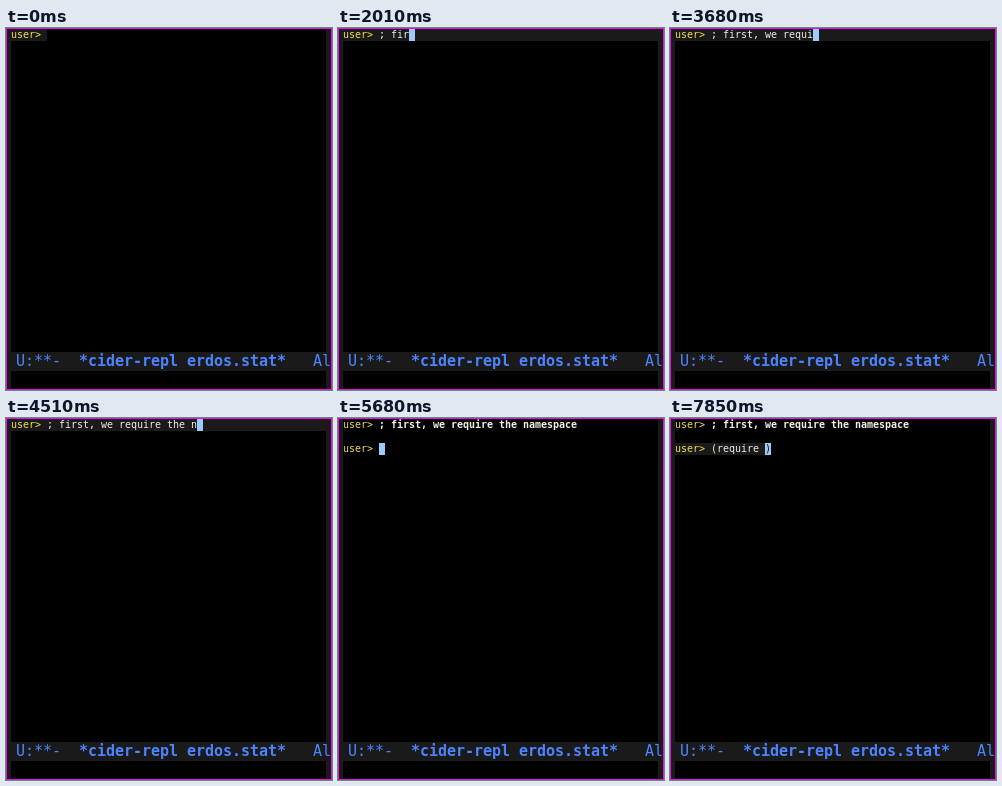
Recreate the animation shown at these times as an HTML page. Size 326x362 px, loop 8000 ms.

```html
<!DOCTYPE html>
<html lang="en">
<head>
<meta charset="utf-8">
<title>REPL typing</title>
<style>
html, body { margin: 0; width: 100%; height: 100%; overflow: hidden; background: #000; }
#stage { position: absolute; width: 326px; height: 362px; overflow: hidden; background: #000;
  font: 10px/12px "DejaVu Sans Mono", monospace; letter-spacing: -.0205px; color: #f0f0e8; }
#stage div { position: absolute; white-space: pre; }
.fringe { top: 0; height: 362px; background: #1a1a1a; }
.line { left: 5px; height: 12px; }
.hl { background: #1a1a1a; }
.wide { width: 315px; }
.done { font-weight: bold; }
.line i { font-style: normal; font-weight: normal; color: #f2e04c; }
.cursor { display: inline-block; width: 6px; height: 12px; vertical-align: top; background: #9ccbfa; color: #111; }
#mode { left: 0; top: 324px; width: 326px; height: 19px; background: #1a1a1a;
  font-size: 15px; line-height: 19px; letter-spacing: -.0308px; color: #4c83ff; text-indent: 10px; }
#frame { left: 0; top: 0; width: 326px; height: 362px; box-sizing: border-box; border: 1px solid #e010e0; }
</style>
</head>
<body>
<div id="stage">
  <div class="fringe" style="left:0;width:5px"></div>
  <div class="fringe" style="left:320px;width:6px"></div>
  <div class="line" id="first" style="top:1px"></div>
  <div class="line" id="second" style="top:25px"></div>
  <div id="mode">U:**-  <b>*cider-repl erdos.stat*</b>   Al</div>
  <div id="frame"></div>
</div>
<script>
// The screen refreshes six times a second; all times below count these ticks.
const TICK = 1000 / 6, LOOP = 48, ENTER = 34, BLINK = 3;
const COMMENT = '; first, we require the namespace', FORM = '(require ';
const PROMPT = '<i>user&gt; </i>';

// Typing pace: [tick, characters so far], linear in between
const commentPace = [[7, 1], [10, 2], [12, 5], [14, 6], [17, 9], [20, 14], [32, 33]];
const formPace = [[39, 1], [40, 1], [42, 4], [45, 8], [47, 9]];

const first = document.getElementById('first');
const second = document.getElementById('second');

function typed(pace, k) {
  const next = pace.findIndex(([at]) => k < at);
  if (next === 0) return 0;
  if (next < 0) return pace[pace.length - 1][1];
  const [k0, n0] = pace[next - 1], [k1, n1] = pace[next];
  return Math.round(n0 + (n1 - n0) * (k - k0) / (k1 - k0) - .05);
}

const cursor = (on, under = ' ') => on ? `<span class="cursor">${under}</span>` : '';

function show(line, html, style) {
  if (line.shown === html + style) return;
  line.shown = html + style;
  line.innerHTML = html;
  line.className = 'line ' + style;
}

function draw(k) {
  if (k < ENTER) {
    const n = typed(commentPace, k);
    const on = n > 0 || k >= 1 && k <= BLINK;
    show(first, PROMPT + COMMENT.slice(0, n) + cursor(on), n ? 'hl wide' : 'hl');
    show(second, '', '');
  } else {
    const n = typed(formPace, k);
    const on = n > 0 || k < ENTER + BLINK;
    show(first, PROMPT + COMMENT, 'done');
    show(second, PROMPT + FORM.slice(0, n) + cursor(on, n ? ')' : ' '), k < ENTER + 2 ? '' : 'hl');
  }
}

const start = performance.now();
(function tick() {
  draw(Math.floor((performance.now() - start) / TICK) % LOOP);
  requestAnimationFrame(tick);
})();
</script>
</body>
</html>
```
